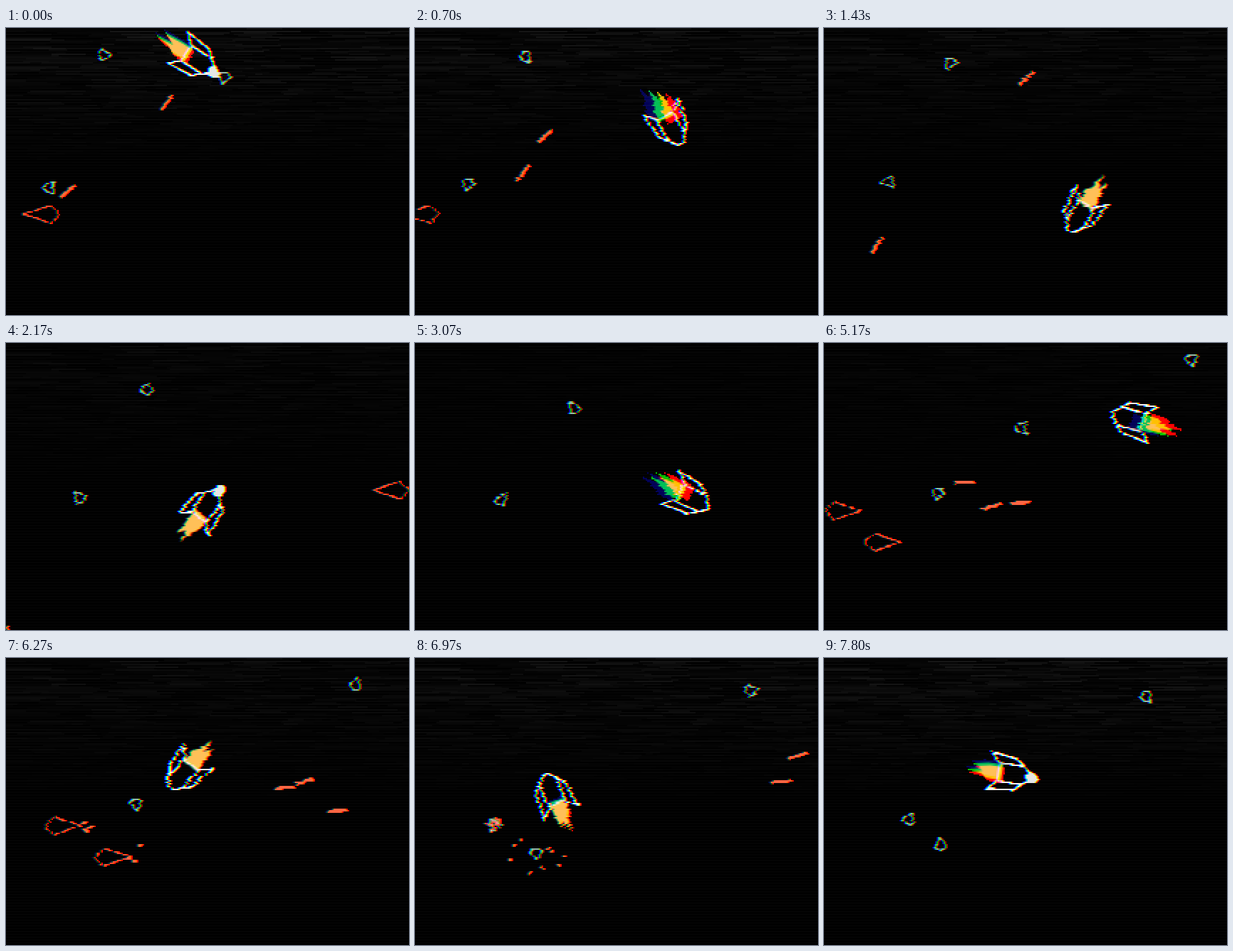
Recreate the animation shown at these times as an HTML page with a canvas. Size 566x404 px, loop 7830 ms.

```html
<!DOCTYPE html>
<html lang="en">
<head>
<meta charset="utf-8">
<title>Glitch flight</title>
<style>
html, body { margin: 0; width: 566px; height: 404px; overflow: hidden; background: #000; }
canvas { display: block; width: 566px; height: 404px; image-rendering: pixelated; }
</style>
</head>
<body>
<canvas id="view" width="283" height="202"></canvas>
<script>
const W = 283, H = 202, LOOP = 7830, TAU = Math.PI * 2;
const view = document.getElementById('view').getContext('2d');
const layer = document.createElement('canvas');
layer.width = W;
layer.height = H;
const g = layer.getContext('2d', { willReadFrequently: true });
const out = view.createImageData(W, H);

const RED = '#ff6644', WHITE = '#f2f2f2', PALE = '#96bcae';
const ORANGE = [255, 192, 88], CYAN = [76, 192, 232];
const SHIP_SPEED = 0.2, BULLET_SPEED = 0.176;

// time, x, y, heading in degrees; the flight between follows the headings
const path = [
  [0, 268, 45, 33], [1430, 360, 262, 119], [2170, 282, 230, 308],
  [3970, 497, 210, 311], [5170, 430, 107, 195], [6270, 248, 163, 131],
  [7800, 263, 163, 9]
];

// drift is the velocity of the drop left behind, in px per second
const enemies = [
  { t: 0, x: 49, y: 262, v: -60, from: 0, until: 1430 },
  { t: 2170, x: 541, y: 207, v: -60, from: 1500, until: 2600 },
  { t: 3970, x: 546, y: 11, v: -60, from: 3300, until: 4050, drift: [-23.5, 11.5] },
  { t: 3970, x: 10, y: 280, v: 60, from: 3300, until: 6650, drift: [-7, -15] },
  { t: 5170, x: 25, y: 236, v: 49, from: 4000, until: 6900, drift: [10, -11] }
];

const drifters = [
  { x: 138, y: 37, v: [27.3, 16], sway: 10, until: 5780 },
  { x: 62, y: 225, v: [19.2, -2.4], sway: 4, until: 6650 },
  { x: 308, y: 70, v: [12, 12], sway: 0, until: 300 }
];

// time, x, y, heading in degrees, time of the shot
const bullets = [
  [0, 86, 230, -39, 0], [0, 225, 105, 127, 0],
  [5170, 274, 225, -3, 3500], [5170, 198, 196, -4, 3600],
  [5170, 235, 230, -17, 4400]
];

const hash = (a, b) => {
  const s = Math.sin(a * 127.1 + b * 311.7 + 17) * 43758.5453;
  return s - Math.floor(s);
};
const rad = deg => deg * Math.PI / 180;
// peaks at the given time and is zero around the opposite phase
const pulse = (t, peak, period) => Math.max(0, Math.cos((t - peak) / period * TAU)) ** 3;
const flip = pts => pts.map(([x, y]) => [x, -y]);
const mirror = pts => pts.concat(flip(pts).reverse());

const hull = mirror([[-17, -13], [16, -13], [27, -4]]);
const wing = [[-19, -13], [-31, -26], [6, -22], [16, -13]];
const dart = [[26, 0], [-12, -12], [-25, 0], [-14, 13]];
const blob = [[19, 0], [25, -7], [33, -5], [40, 3], [33, 9], [23, 8]];
const rock = [10, 7, 10, 8, 9, 4].map((r, i) =>
  [r * Math.cos(i * TAU / 6), r * Math.sin(i * TAU / 6)]);

// faint streaks, fading towards the middle
const haze = new Float32Array(W * H);
for (let y = 0; y < H; y++) {
  const fade = Math.max(0, 1 - y / 100);
  for (let x = 0, run = 0; x < W; run++) {
    const end = Math.min(W, x + 5 + Math.floor(hash(y, run) * 35));
    const v = hash(run, y + 500) ** 2 * 28 * fade;
    while (x < end) haze[y * W + x++] = v;
  }
}

function trace(pts, closed) {
  g.beginPath();
  pts.forEach(([x, y]) => g.lineTo(x, y));
  if (closed) g.closePath();
}

function outline(pts, color, width, closed = true) {
  trace(pts, closed);
  g.strokeStyle = color;
  g.lineWidth = width;
  g.stroke();
}

function fill(pts, color) {
  trace(pts, true);
  g.fillStyle = color;
  g.fill();
}

function bar(w, h) {
  g.fillStyle = RED;
  g.fillRect(-w / 2, -h / 2, w, h);
}

function at(x, y, angle, draw) {
  g.save();
  g.translate(x, y);
  g.rotate(angle);
  draw();
  g.restore();
}

// Hermite flight: position and direction of travel
function shipPose(t) {
  const i = path.findLastIndex(p => t >= p[0]);
  const [t0, x0, y0, h0] = path[i];
  const a0 = rad(h0), move = SHIP_SPEED * (t - t0);
  if (i === path.length - 1) {
    return [x0 + Math.cos(a0) * move, y0 + Math.sin(a0) * move, a0];
  }
  const [t1, x1, y1, h1] = path[i + 1];
  const d = t1 - t0, u = (t - t0) / d, pull = SHIP_SPEED * d, a1 = rad(h1);
  const axis = (p, q, m, n) => {
    const b = 3 * (q - p) - 2 * m - n, c = 2 * (p - q) + m + n;
    return [p + u * (m + u * (b + u * c)), m + u * (2 * b + u * 3 * c)];
  };
  const [x, dx] = axis(x0, x1, Math.cos(a0) * pull, Math.cos(a1) * pull);
  const [y, dy] = axis(y0, y1, Math.sin(a0) * pull, Math.sin(a1) * pull);
  return [x, y, Math.atan2(dy, dx)];
}

function drawFlame(x, y, angle, t, frame) {
  const cold = t > 3600 && t < 4250;
  const sx = 11 * pulse(t, 5170, 2200), sy = 4 * pulse(t, 0, LOOP);
  const reach = cold ? -46 : -60 - hash(frame, 3) * 8;
  const sway = (hash(frame, 7) - 0.5) * 8;
  const shape = [
    [-13, -11], [-34, -11], [reach + 8, -7 + sway], [-43, -2],
    [reach, 3 + sway], [-42, 6], [-34, 11], [-13, 11]
  ];
  g.globalCompositeOperation = 'lighter';
  (cold ? CYAN : ORANGE).forEach((v, k) => {
    const rgb = [0, 0, 0];
    rgb[k] = v;
    at(x + sx * (1 - k), y + sy * (1 - k), angle, () => fill(shape, `rgb(${rgb})`));
  });
  g.globalCompositeOperation = 'source-over';
}

function drawShip(t, frame) {
  const [x, y, angle] = shipPose(t);
  drawFlame(x, y, angle, t, frame);
  at(x, y, angle, () => {
    outline(hull, WHITE, 2.3);
    for (const side of [wing, flip(wing)]) outline(side, WHITE, 2.3, false);
    if (Math.cos(7 * TAU * t / LOOP) > 0.8) fill(blob, '#e6e6e6');
  });
}

function drawRock(x, y, spin) {
  at(x, y, spin, () => outline(rock, PALE, 1.9));
}

function drawDrifter({ x, y, v, sway, until }, n, t) {
  if (t >= until) return;
  const s = t / 1000;
  drawRock(x + v[0] * s, y + v[1] * s - sway * Math.sin(t / 5170 * TAU), n + s * 1.4);
}

function drawSparks(x, y, n, age) {
  for (let i = 0; i < 9; i++) {
    const a = hash(i, n) * TAU, d = age * (50 + hash(n, i) * 90);
    at(x + Math.cos(a) * d, y + Math.sin(a) * d, a, () => bar(9 * (1 - age), 3));
  }
}

function drawEnemy({ t: t0, x: x0, y, v, from, until, drift }, n, t) {
  if (t < from) return;
  const x = x0 + v * (Math.min(t, until) - t0) / 1000;
  if (t < until) {
    const side = Math.sign(v);
    at(x, y, 0, () => outline(dart.map(([a, b]) => [a * side, b]), '#ff5038', 2));
    // muzzle bits before each volley
    if (Math.abs(t % 2300 - 1670) < 90) {
      for (let i = 0; i < 3; i++) {
        at(x + side * (24 + 16 * hash(i, n)), y + (hash(n, i) - 0.6) * 36, 0, () => bar(8, 4));
      }
    }
    return;
  }
  const age = (t - until) / 1000;
  if (age < 0.45) drawSparks(x, y, n, age);
  if (drift) drawRock(x + drift[0] * age, y + drift[1] * age, n + age * 1.4);
}

function drawBullet([t0, x, y, deg, from], t) {
  if (t < from) return;
  const a = rad(deg), d = BULLET_SPEED * (t - t0);
  at(x + Math.cos(a) * d, y + Math.sin(a) * d, a, () => bar(28, 4.4));
}

function drawScene(t, frame) {
  g.setTransform(1, 0, 0, 1, 0, 0);
  g.clearRect(0, 0, W, H);
  g.scale(0.5, 0.5);
  drifters.forEach((d, n) => drawDrifter(d, n, t));
  enemies.forEach((e, n) => drawEnemy(e, n, t));
  bullets.forEach(b => drawBullet(b, t));
  drawShip(t, frame);
}

// hard pixels, row jitter and one-pixel colour split
function present(t, frame) {
  const src = g.getImageData(0, 0, W, H).data, dst = out.data;
  const level = 0.4 + 0.35 * Math.cos(t / LOOP * TAU);
  const shake = 2.7 - 1.6 * pulse(t, 0, LOOP);
  const pick = (x, y, c) => {
    if (x < 0 || x >= W) return 0;
    const i = (y * W + x) * 4;
    return src[i + 3] > 110 ? src[i + c] : 0;
  };
  for (let y = 0; y < H; y++) {
    const shift = Math.round((hash(y, frame) - 0.5) * shake);
    const base = y % 2 ? 0 : 4;
    for (let x = 0; x < W; x++) {
      const i = y * W + x, o = i * 4;
      const floor = base + haze[i] * level;
      for (let c = 0; c < 3; c++) {
        dst[o + c] = Math.max(floor, pick(x - shift - 1 + c, y, c));
      }
      dst[o + 3] = 255;
    }
  }
  view.putImageData(out, 0, 0);
}

const start = performance.now();
let shown = -1;
function tick() {
  const ms = Math.max(0, performance.now() - start) % LOOP;
  const frame = Math.floor((ms + 3.4) * 0.03);
  if (frame !== shown) {
    const t = Math.min(frame / 0.03, LOOP - 1);
    drawScene(t, frame);
    present(t, frame);
    shown = frame;
  }
  requestAnimationFrame(tick);
}
tick();
</script>
</body>
</html>
```
